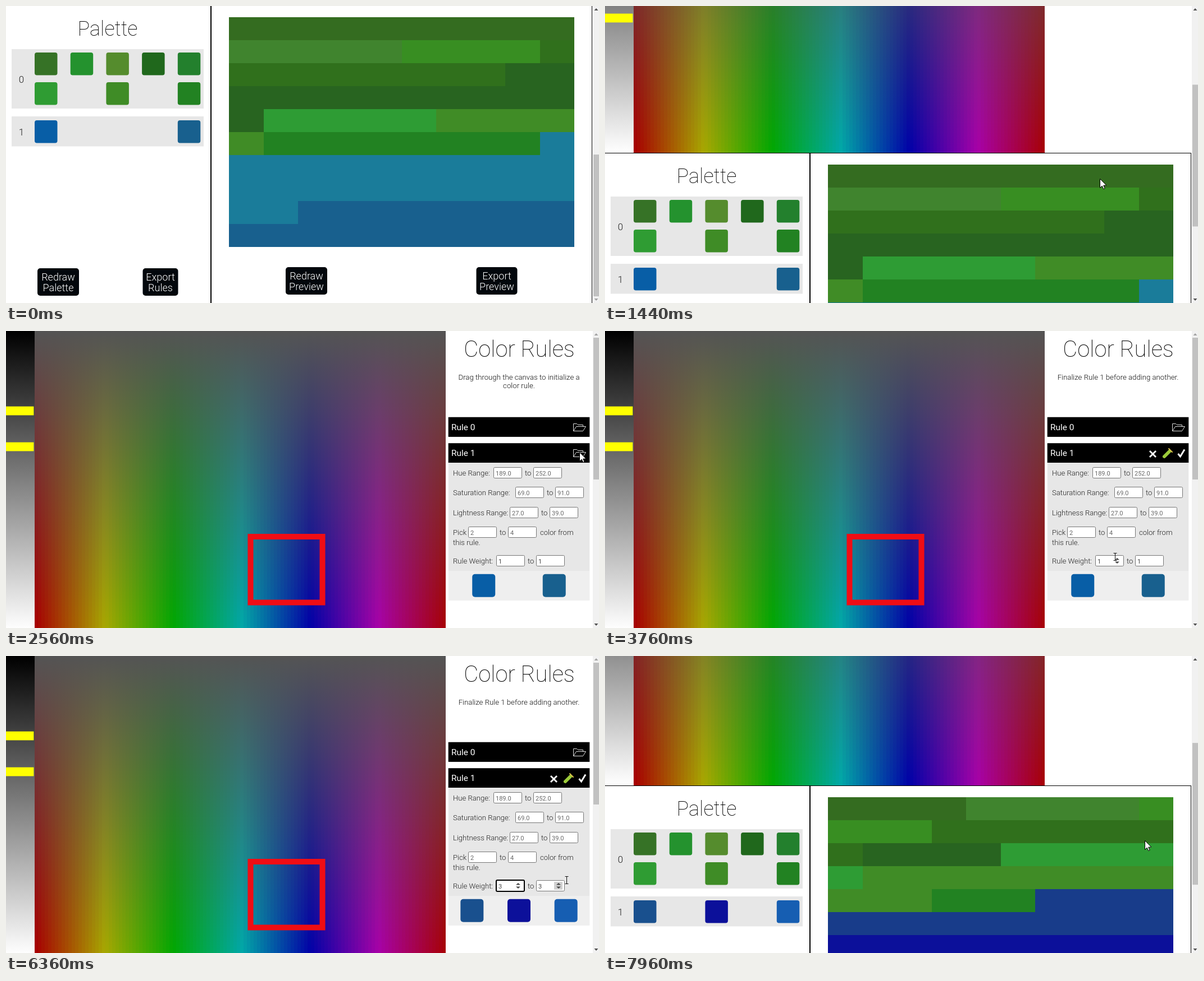
Recreate the animation shown at these times as an HTML page with a canvas. Size 1056 px wide and 530 px high, loop 8000 ms.

```html
<!DOCTYPE html>
<html lang="en">
<head>
<meta charset="utf-8">
<title>Color rules</title>
<style>
html, body { margin: 0; width: 100%; height: 100%; overflow: hidden; background: #fff; }
canvas { display: block; }
</style>
</head>
<body>
<canvas id="stage" width="1056" height="530"></canvas>
<script>
const W = 1056, H = 530, LOOP = 8000, TICK = 40;
const FOLD = 533, MAX_SCROLL = 534, SIDE = 787.7, SIDE_W = 251.6;
const g = document.getElementById('stage').getContext('2d');

// Times of the hard state changes
const OPEN = 2520, EDIT = 3040, CLOSE = 7080;
const CLICKS = [4000, 4440, 4840, 5400];

// Pointer glides: start, end, target x, target y
const GLIDES = [
  [440, 880, 881, 308], [1440, 1920, 949, 295], [1960, 2480, 1021, 216],
  [2960, 3760, 908, 403], [5360, 5760, 985, 403], [6240, 6360, 998, 400],
  [6400, 6480, 1018, 374], [6680, 7000, 1024, 214], [7160, 7480, 991, 258],
  [7560, 7600, 961, 329]
];

const GREENS = ['#367226', '#24922e', '#558c2d', '#20681c', '#23802d', '#2f9c33', '#3f8c26', '#228222'];
const GRASS = ['#346c20', '#40842e', '#388e22', '#30701c', '#286420', '#2e9c34', '#408c26', '#228222'];
const BEFORE = {
  blues: ['#085ea6', '#18608e'],
  cells: [...GRASS, '#1a7c9a', '#18608e'],
  runs: [10, 5, 4, 9, 13, 5, 5, 8, 23, 18]
};
const AFTER = {
  blues: ['#19508e', '#0c109a', '#165eb2'],
  cells: [...GRASS, '#183c8a', '#0c109a', '#165eb2'],
  runs: [4, 5, 4, 8, 4, 6, 12, 3, 14, 20, 20]
};

const progress = (t, a, b) => Math.min(1, Math.max(0, (t - a) / (b - a)));
const smooth = k => k * k * (3 - 2 * k);
const noise = n => Math.abs(Math.sin(n * 127.1) * 43758.5) % 1;

function scrollAt(t) {
  if (t < 960) return MAX_SCROLL;
  const u = (t - 960) / 480;
  const up = u < 2.2 ? Math.max(0, 515 - 246.5 * u + 2.5 * u * u) : 0;
  return Math.round(up + 302 * progress(t, 7760, 7960));
}

function pointerAt(t) {
  let x = 945, y = 515;
  for (const [from, to, tx, ty] of GLIDES) {
    const k = smooth(progress(t, from, to));
    x += (tx - x) * k;
    y += (ty - y) * k;
  }
  return [Math.round(x), Math.round(y)];
}

function box(x, y, w, h, fill) {
  g.fillStyle = fill;
  g.fillRect(x, y, w, h);
}

function round(x, y, w, h, r, fill) {
  g.fillStyle = fill;
  g.beginPath();
  g.roundRect(x, y, w, h, r);
  g.fill();
}

function text(s, x, y, size, color = '#111', align = 'left', weight = 300) {
  g.font = `${weight} ${size}px Roboto, "Open Sans", sans-serif`;
  g.textAlign = align;
  g.fillStyle = color;
  g.fillText(s, x, y);
}

function trace(points, close) {
  g.beginPath();
  points.forEach(([x, y]) => g.lineTo(x, y));
  if (close) g.closePath();
}

function line(points, color, width, close) {
  trace(points, close);
  g.strokeStyle = color;
  g.lineWidth = width;
  g.stroke();
}

function poly(points, fill) {
  trace(points, true);
  g.fillStyle = fill;
  g.fill();
}

function triangle(x, y, w, h, fill) {
  poly([[x - w, y], [x, y + h], [x + w, y]], fill);
}

// Hue across, saturation down, plus the lightness strip
function makeSpectrum() {
  const c = document.createElement('canvas');
  c.width = 783;
  c.height = FOLD;
  const p = c.getContext('2d');
  const fill = (x, w, top, bottom) => {
    const grad = p.createLinearGradient(0, 0, 0, FOLD);
    grad.addColorStop(0, top);
    grad.addColorStop(1, bottom);
    p.fillStyle = grad;
    p.fillRect(x, 0, w, FOLD);
  };
  fill(0, 51, '#000', '#fff');
  for (let i = 0; i < 122; i++) fill(51 + i * 6, 6, '#545454', `hsl(${i * 360 / 122}, 100%, 33%)`);
  return c;
}
const spectrum = makeSpectrum();

function spectrumPanel(open) {
  g.drawImage(spectrum, 0, 0);
  for (const y of open ? [134.6, 198.6] : [230.6, 284.6]) box(0, y, 49.4, 15.8, '#ff0');
  if (open) {
    g.strokeStyle = '#f00d14';
    g.lineWidth = 10;
    g.strokeRect(435.5, 367, 128, 117.5);
  }
}

function folder(x, y) {
  line([[x, y + 14], [x, y + 1], [x + 6, y + 1], [x + 8, y + 3], [x + 17, y + 3], [x + 17, y + 6]], '#ddd', 1);
  line([[x, y + 14], [x + 5, y + 6], [x + 22, y + 6], [x + 17, y + 14]], '#ddd', 1, true);
}

function editIcons() {
  line([[970, 214], [981, 225]], '#fff', 2.8);
  line([[981, 214], [970, 225]], '#fff', 2.8);
  g.lineCap = 'round';
  line([[996, 224], [1005, 215]], '#9ccb3a', 6);
  line([[1004, 210], [1010, 216]], '#d9c04a', 2);
  g.lineCap = 'butt';
  line([[1020.5, 219], [1024.5, 224], [1032, 211.5]], '#fff', 3);
}

function spinner(x, y, hover) {
  if (hover) box(x - 8, y - 7, 15, 14, '#d0d0d0');
  triangle(x, y - 1.5, 4, -3.5, '#444');
  triangle(x, y + 1.5, 4, 3.5, '#444');
}

function field(x, y, value, color, focus) {
  const inset = focus ? 0 : .5;
  g.beginPath();
  g.roundRect(x + inset, y - 10 + inset, 50, 20 - 2 * inset, 2);
  g.fillStyle = '#fff';
  g.fill();
  g.strokeStyle = focus ? '#000' : '#767676';
  g.lineWidth = focus ? 2 : 1;
  g.stroke();
  text(value, x + 4, y + 4.5, 11, color, 'left', 400);
}

function range(label, y, x, low, high, color = '#666', focus) {
  text(label, 796, y + 4.5, 13.1, '#222');
  field(x, y, low, color, focus);
  text('to', x + 56, y + 4.5, 13.1, '#222');
  field(x + 71.5 | 0, y, high, color);
}

// Fresh random blues from the rule's ranges after each click
function samples(clicks) {
  if (!clicks) return BEFORE.blues;
  if (clicks === CLICKS.length) return AFTER.blues;
  return Array.from({ length: clicks === 1 ? 3 : 2 }, (_, i) => {
    const pick = (low, high, k) => low + (high - low) * noise(clicks * 9 + i * 3 + k);
    return `hsl(${pick(189, 252, 0)}, ${pick(69, 91, 1)}%, ${pick(27, 39, 2)}%)`;
  });
}

function ruleForm(t) {
  const clicks = CLICKS.filter(c => t >= c).length;
  const weight = Math.min(3, clicks + 1);
  box(SIDE, 235, SIDE_W, 193, '#e7e7e7');
  box(SIDE, 428, SIDE_W, 53, '#efefef');
  range('Hue Range:', 253, 868, '189.0', '252.0');
  range('Saturation Range:', 288, 907, '69.0', '91.0');
  range('Lightness Range:', 324, 897, '27.0', '39.0');
  range('Pick', 359, 823, '2', '4');
  text('color from', 951, 363.5, 13.1, '#222');
  text('this rule.', 796, 382, 13.1, '#222');
  range('Rule Weight:', 410, 873, weight, weight, '#444', clicks > 0);
  if (t >= 3680) spinner(912, 410, false);
  if (t >= 5560 && t < 6400) spinner(984, 410, true);

  const colors = samples(clicks), gap = 251 / colors.length;
  colors.forEach((c, i) => round(788 + gap * (i + .5) - 20.5, 433.7, 41, 41, 5, c));
}

function rulesPanel(t, open) {
  const edit = open && t >= EDIT;
  const note = edit ? ['Finalize Rule 1 before adding another.']
    : ['Drag through the canvas to initialize a', 'color rule.'];
  text('Color Rules', 914, 46, 40, '#000', 'center', 200);
  note.forEach((s, i) => text(s, 913.5, 87 + i * 15, 13.2, '#111', 'center'));
  for (let i = 0; i < 2; i++) {
    const y = 153.7 + i * 46.5;
    box(SIDE, y, SIDE_W, 35.2, '#000');
    text('Rule ' + i, 793, y + 23, 15.4, '#fff', 'left', 400);
    if (!i || !edit) folder(1010.5, Math.round(y) + 10.5);
  }
  if (edit) editIcons();
  if (open) ruleForm(t);
}

function button(x, y, w, top, bottom) {
  round(x, y, w, 49, 5, '#02070c');
  text(top, x + w / 2, y + 21.5, 18, '#fff', 'center');
  text(bottom, x + w / 2, y + 40.5, 18, '#fff', 'center');
}

function swatch(col, y, color) {
  round(51 + col * 63.7, y, 40.5, 40.5, 4, color);
}

function preview({ cells, runs }) {
  const edge = col => Math.round(397 + col * 61.5);
  let n = 0;
  runs.forEach((count, i) => {
    for (const end = n + count; n < end; n++) {
      const col = n % 10, row = Math.floor(n / 10);
      box(edge(col), 554 + row * 41, edge(col + 1) - edge(col), 41, cells[i]);
    }
  });
}

function lowerPage(set) {
  box(0, FOLD, 1044, 1, '#000');
  box(364, FOLD, 2, 540, '#000');
  box(1043, FOLD, 1, 540, '#000');

  text('Palette', 181, 587, 36, '#000', 'center', 200);
  box(10, 611, 342, 106, '#e7e7e7');
  box(10, 731, 342, 53.5, '#e7e7e7');
  text('0', 27.5, 671, 17, '#222', 'center');
  text('1', 27.5, 765, 17, '#222', 'center');
  GREENS.forEach((c, i) => swatch(i < 5 ? i : (i - 5) * 2, i < 5 ? 617 : 670, c));
  set.blues.forEach((c, i) => swatch(i * 4 / (set.blues.length - 1), 738, c));
  preview(set);

  button(56, 1002, 74, 'Redraw', 'Palette');
  button(243.5, 1002, 63, 'Export', 'Rules');
  button(498, 1000, 74, 'Redraw', 'Preview');
  button(837.5, 1000, 73, 'Export', 'Preview');
}

function scrollbar(pos) {
  const tint = active => active ? '#505050' : '#a3a3a3';
  box(1044, 0, 12, H, '#fff');
  box(1045, 0, 11, H, '#f1f1f1');
  box(1046, 12 + pos * .474, 10, 253, '#c1c1c1');
  triangle(1051, 8, 3.5, -4, tint(pos > 0));
  triangle(1051, 522, 3.5, 4, tint(pos < MAX_SCROLL));
}

function pointer(t) {
  if (t < 440) return;
  const [x, y] = pointerAt(t);
  if (t >= 3680 && t < 6440) {
    line([[x + .5, y - 6], [x + .5, y + 6]], '#111', 1);
    for (const d of [-6.5, 6.5]) line([[x - 2.5, y + d], [x + 3.5, y + d]], '#111', 1);
    return;
  }
  const shape = [[0, 0], [0, 16], [3.7, 12.6], [6.2, 18], [8.6, 17], [6.2, 11.7], [11.3, 11.4]]
    .map(([a, b]) => [x + a + .5, y + b + .5]);
  poly(shape, '#fff');
  line(shape, '#000', 1, true);
}

function draw(t) {
  const pos = scrollAt(t), open = t >= OPEN && t < CLOSE;
  box(0, 0, W, H, '#fff');
  g.save();
  g.translate(0, -pos);
  spectrumPanel(open);
  rulesPanel(t, open);
  lowerPage(t < CLICKS[0] ? BEFORE : AFTER);
  g.restore();
  scrollbar(pos);
  pointer(t);
}

const start = performance.now();
function frame() {
  const t = (performance.now() - start) % LOOP;
  draw(Math.floor(t / TICK) * TICK);
  requestAnimationFrame(frame);
}
frame();
</script>
</body>
</html>
```
